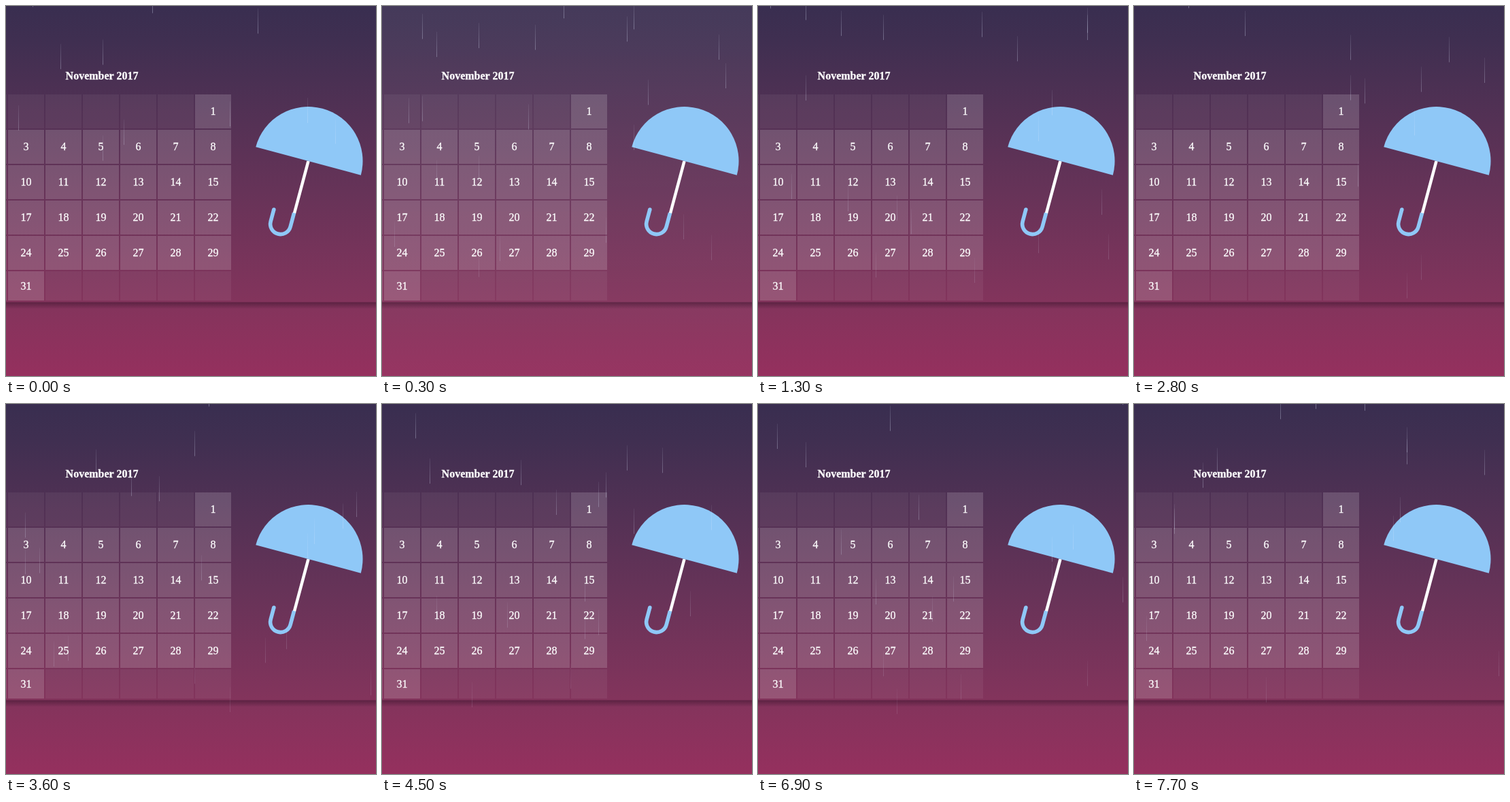
Animation of 544 by 544 pixels, one loop 7800 ms. Source, as an HTML page:

```html
<!DOCTYPE html>
<html lang="en">
<head>
<meta charset="utf-8">
<title>Rainy calendar</title>
<style>
  html, body { margin: 0; width: 100%; height: 100%; overflow: hidden; background: #3a2e50; }
  svg { display: block; width: 100%; height: 100%; }
  text {
    font: 16px "Liberation Serif", "Times New Roman", serif;
    fill: #fff; stroke: #fff; stroke-width: .3; text-anchor: middle;
  }
  .title { font-weight: bold; }
</style>
</head>
<body>
<svg id="stage" viewBox="0 0 544 544">
  <defs>
    <linearGradient id="sky" x2="0" y2="1">
      <stop offset="0" stop-color="#392e50"/>
      <stop offset=".1" stop-color="#402f51"/>
      <stop offset=".5" stop-color="#663358"/>
      <stop offset=".8" stop-color="#83345c"/>
      <stop offset="1" stop-color="#95305e"/>
    </linearGradient>
    <linearGradient id="haze" x2="0" y2="1">
      <stop offset="0" stop-color="#fff" stop-opacity=".08"/>
      <stop offset="1" stop-color="#fff" stop-opacity=".03"/>
    </linearGradient>
    <linearGradient id="shade" x2="0" y2="1">
      <stop offset="0" stop-color="#2a0c22" stop-opacity=".45"/>
      <stop offset="1" stop-color="#2a0c22" stop-opacity="0"/>
    </linearGradient>
    <linearGradient id="streak" x2="0" y2="1">
      <stop offset="0" stop-color="#dfe9ff" stop-opacity=".25"/>
      <stop offset="1" stop-color="#dfe9ff"/>
    </linearGradient>
  </defs>
  <rect width="544" height="544" fill="url(#sky)"/>
  <rect id="glow" width="544" height="544" fill="url(#haze)" opacity="0"/>
  <rect y="435.5" width="544" height="10" fill="url(#shade)"/>
  <g id="days"></g>
  <text class="title" x="141" y="108">November 2017</text>
  <g transform="translate(444.5 228) rotate(15)" fill="none">
    <path d="M0 0V80" stroke="#fff" stroke-width="4.5"/>
    <path d="M-80 0A80 80 0 0 1 80 0Z" fill="#8fc8f7"/>
    <path d="M-.5 79V100A15 15 0 0 1 -30.5 100V82" stroke="#8fc8f7" stroke-width="5.6"/>
    <circle cx="-30.5" cy="82" r="2.8" fill="#8fc8f7"/>
  </g>
  <g id="rain"></g>
</svg>
<script>
const LOOP = 7800, STEP = 100;
const SPEED = 57, LENGTH = 37, FLOOR = 456, DROPS = 180;
const $ = id => document.getElementById(id);

function add(parent, tag, attrs, text) {
  const el = document.createElementNS("http://www.w3.org/2000/svg", tag);
  for (const k in attrs) el.setAttribute(k, attrs[k]);
  if (text) el.textContent = text;
  parent.append(el);
  return el;
}

// Calendar: the leftmost column is almost entirely off stage.
for (let row = 0; row < 6; row++) {
  for (let col = -1; col < 6; col++) {
    const day = row * 7 + col - 4;
    const filled = day >= 1 && day <= 31;
    const x = 3 + col * 55, y = 130 + row * 52, height = row < 5 ? 50 : 43;
    add($("days"), "rect", { x, y, width: 53, height, fill: "#fff", "fill-opacity": filled ? .16 : .055 });
    if (filled && col >= 0) add($("days"), "text", { x: x + 26.5, y: y + height / 2 + 5.3 }, String(day));
  }
}

// Drops fall in evenly spaced columns, each launched at a seeded tick.
let seed = 17;
const random = () => (seed = seed * 16807 % 2147483647) / 2147483647;
const drops = Array.from({ length: DROPS }, () => {
  const launch = random() * 78 - 4;
  const x = Math.round(18 + 10.36 * Math.floor(random() * 51));
  return { launch, el: add($("rain"), "rect", { x, width: 1, height: LENGTH, fill: "url(#streak)" }) };
});

// Rain moves ten times a second, with two short pauses.
const clamp = (v, max) => Math.min(Math.max(v, 0), max);
const rainTick = n => n - clamp(n - 41, 3) - clamp(n - 72, 1);

function draw(ms) {
  const n = Math.floor(ms / STEP);
  const tick = rainTick(n);
  $("glow").setAttribute("opacity", Math.max(0, n < 4 ? n / 4 : (9 - n) / 5));
  for (const { el, launch } of drops) {
    const y = (tick - launch) * SPEED - LENGTH;
    const seen = y > -LENGTH && y < FLOOR - LENGTH;
    el.setAttribute("visibility", seen ? "visible" : "hidden");
    if (!seen) continue;
    el.setAttribute("y", y.toFixed(1));
    el.setAttribute("opacity", (.34 - .24 * Math.max(y, 0) / FLOOR).toFixed(3));
  }
}

const start = performance.now();
function frame(now) {
  draw(Math.max(0, now - start) % LOOP);
  requestAnimationFrame(frame);
}
draw(0);
requestAnimationFrame(frame);
</script>
</body>
</html>
```
